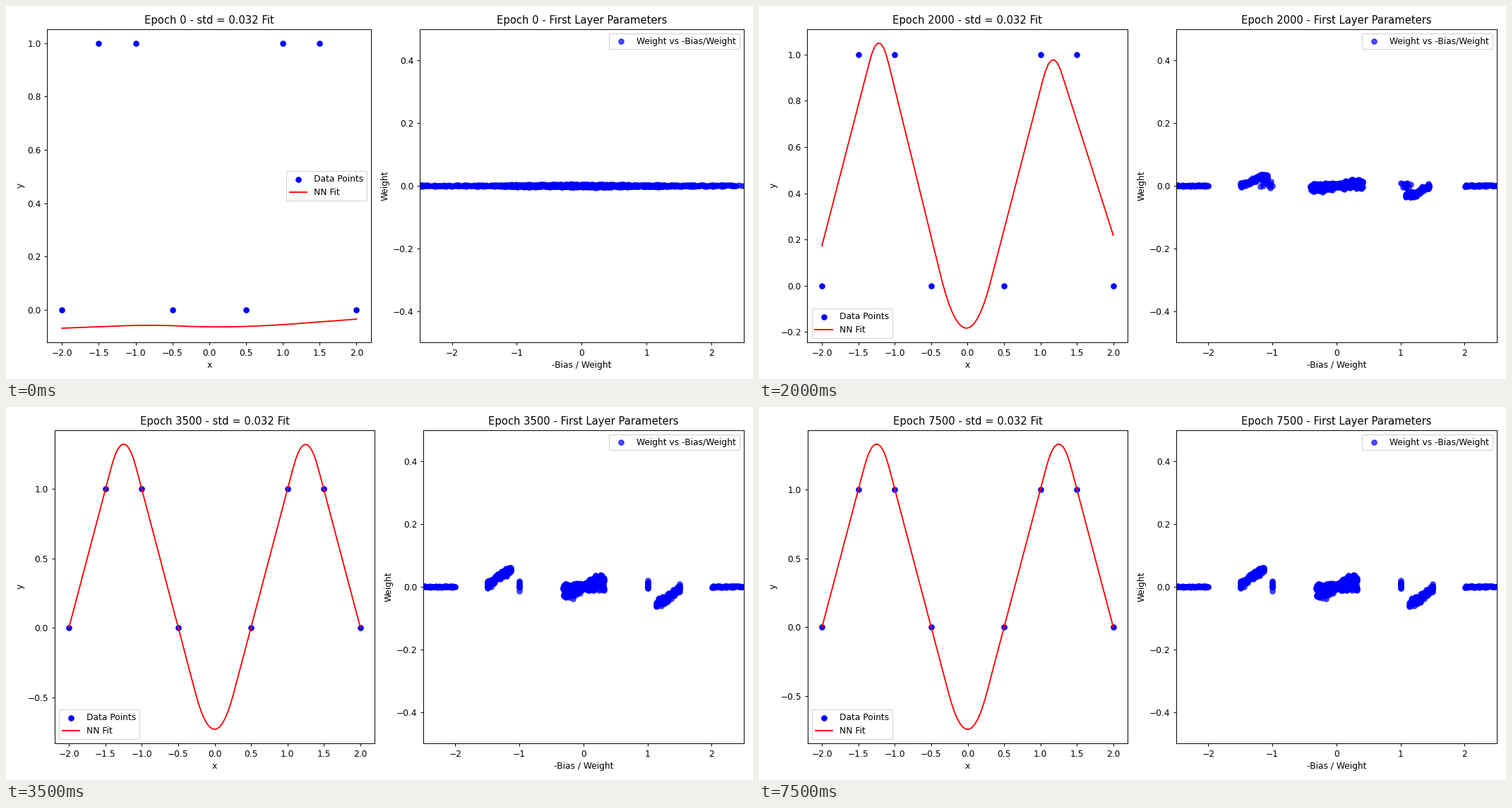
Animation of 1058 by 529 pixels, one loop 8 s. Source, as a matplotlib script:

```python
import numpy as np
import matplotlib.pyplot as plt
from matplotlib.animation import FuncAnimation

DPI = 88.166667
FRAMES, INTERVAL, EPOCH_STEP = 16, 500, 500
plt.rcParams["axes.labelpad"] = 3.3

DATA_X = np.array([-2, -1.5, -1, -0.5, 0.5, 1, 1.5, 2])
DATA_Y = np.array([0, 1, 1, 0, 0, 1, 1, 0])
GRID = np.linspace(-2, 2, 100)

# Each stage of the fit: corner x (3), height at both ends and corners (5),
# rounding of the peaks and of the trough.
FITS = np.array([
    [-0.80, 0.05, 0.80, -.069, -.056, -.066, -.060, -.035, .40, .40],
    [-1.00, 0.02, 1.00, .515, .517, .277, .489, .536, .03, .65],
    [-1.18, -.02, 1.09, .308, .828, .070, .748, .348, .08, .40],
    [-1.24, -.03, 1.215, .073, 1.347, -.736, 1.263, .124, .16, .30],
    [-1.25, 0, 1.25, 0, 1.5, -1, 1.5, 0, .172, .26],
])


def stage_at(epoch):
    return np.interp(epoch, [0, 500, 1000, 1500, 2000, 2500, 3000, 3500, 4500],
                     [0, 1, 1.12, 2, 2.58, 3, 3.72, 3.965, 4])


def blend(keys, stage):
    i = min(int(stage), len(keys) - 2)
    f = stage - i
    return (1 - f) * keys[i] + f * keys[i + 1]


def soft_hinge(x, r):
    """ReLU whose corner is rounded over [-r, r]."""
    return np.clip(x + r, 0, 2 * r) ** 2 / (4 * r) + np.maximum(x - r, 0)


def fit_curve(stage):
    row = blend(FITS, stage)
    corners, heights, (peak_r, trough_r) = row[:3], row[3:8], row[8:]
    slopes = np.diff(heights) / np.diff([-2, *corners, 2])
    y = heights[0] + slopes[0] * (GRID + 2)
    for c, bend, r in zip(corners, np.diff(slopes), (peak_r, trough_r, peak_r)):
        y = y + bend * soft_hinge(GRID - c, r)
    return y


def build_neurons():
    """(breakpoint, weight) of every neuron at each stage."""
    rng = np.random.default_rng(4)
    w, b, e = rng.normal(size=(3, 1300))
    r = rng.random(1300)
    x0 = -b / w
    keep = np.abs(x0) < 2.7
    x0, w, r = x0[keep], .0018 * w[keep], r[keep]
    e = np.clip(e[keep], -2.2, 2.2)

    side, d = np.sign(x0), np.abs(x0)
    outer, inner = d > 1.7, d < .75
    ring = ~(outer | inner)
    column = ring & (r < .06)
    u = (d - .75) / .95

    def spread(inner_scale, ring_d):
        return side * np.select([outer, inner], [2 + .7 * (d - 1.7), inner_scale * d], ring_d)

    early = spread(.9, 1 + .01 * e), 2 * w

    ring_d = 1 + (.44 - .06 * side) * u
    hump = .024 * np.exp(-((ring_d - 1.13) / .09) ** 2) * (.4 + .6 * r)
    rising = spread(.64, ring_d), np.where(outer, w, 2 * w) - ring * side * hump

    # Neurons gather between the data points, with weights growing in lobes.
    ring_d = np.where(column, 1, np.minimum(1.5, 1.13 + .41 * u))
    wing = np.interp(ring_d, [1.13, 1.3, 1.5], [.055, .038, .004])

    def settled(scale, gain):
        x = spread(scale, ring_d)
        lobe = np.minimum(.19 * np.abs(x), .036) * np.maximum(0, 2 * r - 1)
        y = np.select([outer, inner, column],
                      [w, side * gain * lobe + .005 * e, .005 + .009 * e],
                      -side * gain * wing + .006 * e)
        return x, y

    keys = (x0, w), early, rising, settled(.48, .85), settled(.43, 1)
    return np.array(keys)


NEURONS = build_neurons()

fig, (fit_ax, par_ax) = plt.subplots(1, 2, figsize=(12, 6), dpi=DPI)


def update(frame):
    epoch = frame * EPOCH_STEP
    stage = stage_at(epoch)

    fit_ax.clear()
    fit_ax.scatter(DATA_X, DATA_Y, color="blue", label="Data Points")
    fit_ax.plot(GRID, fit_curve(stage), color="red", label="NN Fit")
    fit_ax.set(title=f"Epoch {epoch} - std = 0.032 Fit", xlabel="x", ylabel="y")
    fit_ax.legend()

    par_ax.clear()
    x, y = blend(NEURONS, stage)
    par_ax.scatter(x, y, color="blue", alpha=0.7, label="Weight vs -Bias/Weight")
    par_ax.set(title=f"Epoch {epoch} - First Layer Parameters",
               xlabel="-Bias / Weight", ylabel="Weight",
               xlim=(-2.5, 2.5), ylim=(-0.5, 0.5))
    par_ax.legend(loc="upper right")

    # Start from the same layout so every loop is identical.
    fig.subplots_adjust(.125, .11, .9, .88, .2, .2)
    fig.tight_layout()


anim = FuncAnimation(fig, update, frames=FRAMES, interval=INTERVAL, repeat=True)
plt.show()
```
